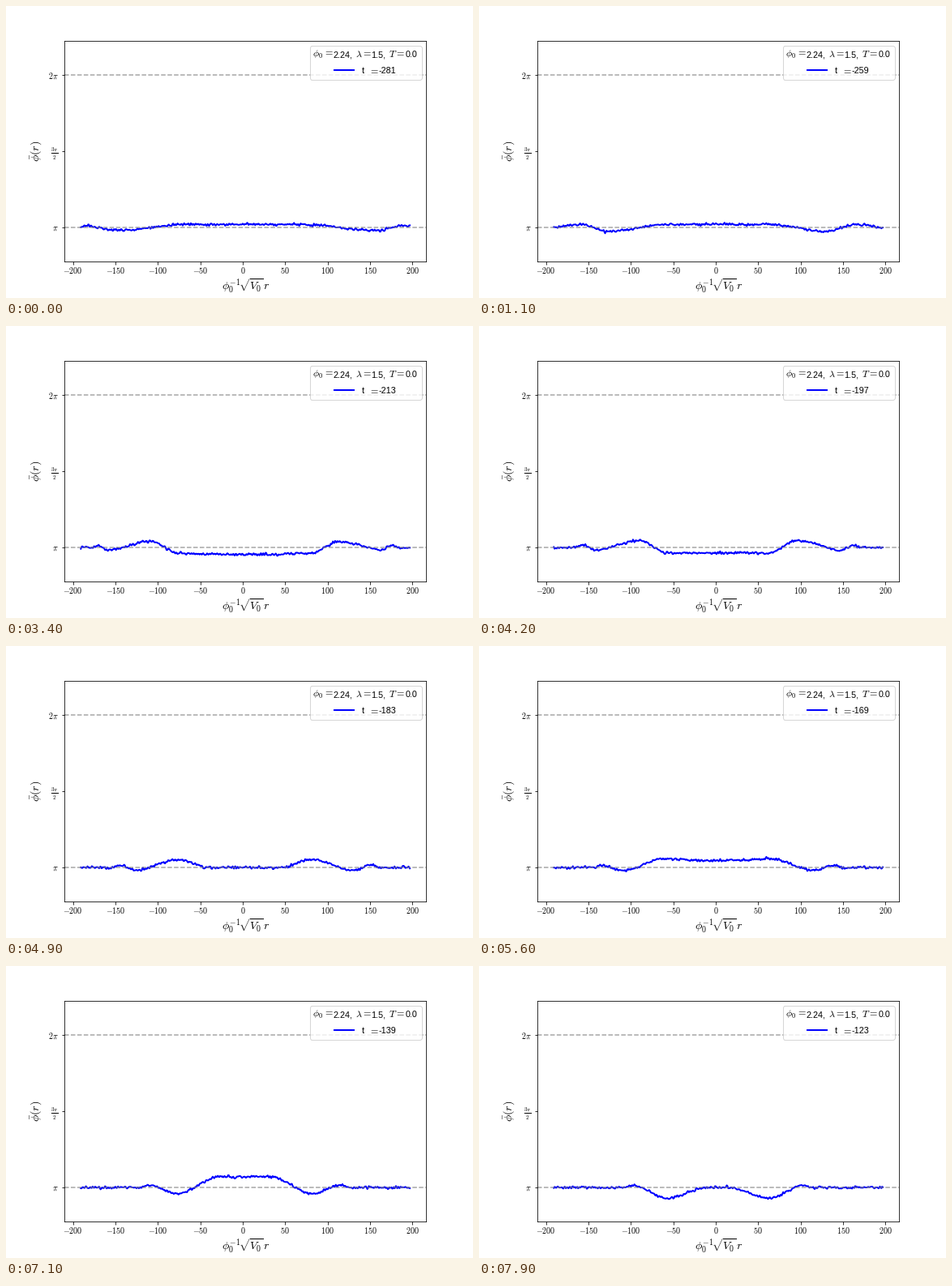
Recreate the animation shown at these times as a matplotlib script. Size 576 by 360 pixels, loop 8000 ms.

```python
import numpy as np
import matplotlib.pyplot as plt
from matplotlib.animation import FuncAnimation
from matplotlib.lines import Line2D
from matplotlib.patches import FancyBboxPatch
from matplotlib.transforms import Affine2D

plt.rcParams["mathtext.fontset"] = "cm"

W, H, DPI = 576, 360, 72
FRAMES, STEP = 80, 100
PI = np.pi

fig = plt.figure(figsize=(W / DPI, H / DPI), dpi=DPI, facecolor="white")
ax = fig.add_axes([0.125, 0.125, 0.775, 0.755])
ax.set_ylim(PI - 0.7, 2 * PI + 0.7)
R0, R1 = -190.8, 197.0
pad = (R1 - R0) * 0.05
ax.set_xlim(R0 - pad, R1 + pad)

# stage pixels, y down
px = Affine2D().scale(1, -1).translate(0, H)
PX_PER_R = 0.775 * W / (R1 - R0 + 2 * pad)
PHI_PER_PX = (PI + 1.4) / (0.755 * H)

r = np.linspace(R0, R1, 450)
dist = np.abs(r - 2.7) * PX_PER_R

# small random travelling ripples
rng = np.random.default_rng(7)
MODES = 120
wave_k = rng.uniform(0.06, 2.6, MODES)
omega = np.sqrt(wave_k ** 2 + 0.05) * rng.choice([-1, 1], MODES)
phase = rng.uniform(0, 2 * PI, MODES)


def ease(u):
    u = np.clip(u, 0, 1)
    return u * u * (3 - 2 * u)


def mix(a, b, u):
    return a + (b - a) * ease(u)


def profile(i):
    """Growing oscillation in the core, wave fronts running inwards (pixels)."""
    core = -4.2 * np.exp(0.0205 * i) * np.cos(2 * PI * (i - 34) / 60)
    trough = max(160 - 2.35 * i, 8)
    crest = 196 - 2.33 * i
    dip = 250 - 2.35 * i
    rim = dip + max(6, 0.7 * i - 14)
    pos = np.array([0, min(70, 0.45 * trough), trough, crest, dip, rim, rim + 10])
    height = np.array([
        core, core,
        mix(-3.5 - 0.1 * i, core, (i - 30) / 18),
        mix(2 + 0.16 * i, core, (i - 63) / 16),
        -3 - 10 * (i / 79) ** 8,
        2.8, 0])
    j = np.clip(np.searchsorted(pos, dist) - 1, 0, len(pos) - 2)
    return mix(height[j], height[j + 1], (dist - pos[j]) / (pos[j + 1] - pos[j]))


def field(i):
    ripple = np.cos(np.outer(r, wave_k) - omega * 2 * i + phase).sum(axis=1)
    return PI + PHI_PER_PX * (profile(i) + 0.75 * ripple * np.sqrt(2 / MODES))


def label(x, y, s, size=12, **kw):
    return fig.text(x, y, s, transform=px, fontsize=size, va="baseline", **kw)


def sans(x, y, s):
    return label(x, y, s, 10.7, family="Liberation Sans")


curve, = ax.plot(r, field(0), color="blue", lw=2)
for level in (PI, 2 * PI):
    ax.axhline(level, color="gray", ls="--", lw=1.5, alpha=0.7, zorder=2.1)

xt = np.arange(-200, 201, 50)
ax.set_xticks(xt, [f"${v}$" for v in xt])
ax.set_yticks([PI, 1.5 * PI, 2 * PI], [r"$\pi$", r"$\frac{3\pi}{2}$", r"$2\pi$"])
ax.tick_params(labelsize=10)
ax.tick_params(axis="x", pad=2)
label(295.2, 350.5,
      r"$\phi_0^{-1}\hspace{-0.1}\sqrt{\hspace{-0.1}V_0\hspace{-0.1}}"
      r"\hspace{0.15}r$", 14, ha="center")
label(41, 179, r"$\bar{\phi}(r)$", 14, ha="center", rotation=90,
      rotation_mode="anchor")

# legend
fig.add_artist(FancyBboxPatch(
    (374.5, 49.2), 138, 41.6, boxstyle="round,pad=0,rounding_size=2.4",
    fc="white", ec="0.8", lw=1, alpha=0.8, snap=True, transform=px))
fig.add_artist(Line2D([405, 429], [79, 79], color="blue", lw=2, transform=px))
for x, name, value_x, value in ((378.4, r"\phi_0", 403, "2.24,"),
                                (430.8, r"\lambda", 450.4, "1.5,"),
                                (472.4, "T", 493, "0.0")):
    label(x, 63.3, rf"${name}\hspace{{0.08}}=$")
    sans(value_x, 63.3, value)
sans(438.6, 83, "t")
label(446.8, 83, "$=$", ha="left")
clock = sans(460, 83, "")


def draw(i):
    curve.set_ydata(field(i))
    clock.set_text(f"{2 * i - 281}")
    return curve, clock


anim = FuncAnimation(fig, draw, frames=FRAMES, interval=STEP, repeat=True,
                     repeat_delay=0, blit=False)
plt.show()
```
